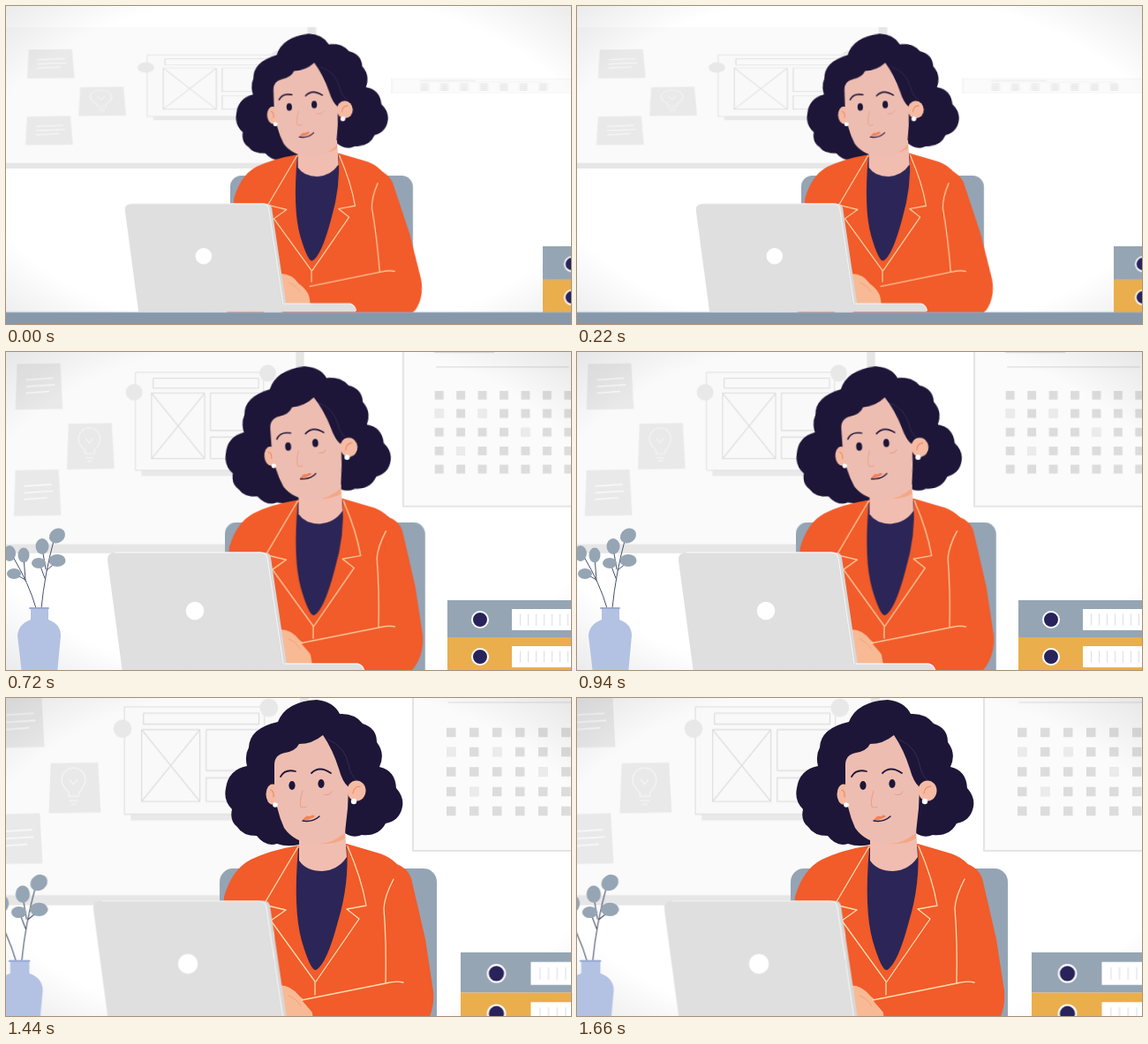
An HTML page for the animation above (1.8 s loop, 640 px wide and 360 px high).

```html
<!DOCTYPE html>
<html lang="en">
<head>
<meta charset="utf-8">
<title>At the desk</title>
<style>
html, body { margin: 0; width: 100%; height: 100%; overflow: hidden; background: #fff; }
svg { display: block; width: 100%; height: 100%; }

/* Every layer holds five poses, 360 ms each */
.layer { animation: 1800ms step-end infinite; }
#board { animation-name: board; transform-origin: 0 0; }
#calendar { animation-name: calendar; transform-origin: 0 0; }
#chair { animation-name: chair; transform-origin: 316.6px 187px; }
#hair { animation-name: hair; transform-origin: 349px 84px; }
#body { animation-name: body; transform-origin: 350px 169px; }
#arm { animation-name: arm; transform-origin: 430px 215px; }
#face { animation-name: face; transform-origin: 340.5px 98px; }
#desk { animation-name: desk; transform-origin: 311px 195px; }
#binders { animation-name: binders; }
#vase { animation-name: vase; }

@keyframes board {
  0% { transform: translate(11.7px, 39px) scale(.94, .59); }
  20% { transform: none; }
  40% { transform: translate(-1.5px, -3.3px) scale(.94); }
  60% { transform: translate(-16.6px, -12.6px) scale(.985); }
  80%, 100% { transform: translate(-28.7px, -18.8px) scale(1.03); }
}
@keyframes calendar {
  0% { transform: translate(40px, 85.4px) scale(.861, .078); }
  20% { transform: translate(11.2px, 34.3px) scale(.915, .762); }
  40% { transform: translate(16.7px, 12.3px) scale(.94); }
  60% { transform: translate(6px, 4.9px) scale(.976); }
  80%, 100% { transform: none; }
}
@keyframes chair {
  0% { transform: scale(.842); }
  20% { transform: scale(.853); }
  40% { transform: scale(.923); }
  60% { transform: scale(.968); }
  80%, 100% { transform: none; }
}
@keyframes hair {
  0% { transform: translate(-4px, 17.5px) rotate(-4deg) scale(.855); }
  20% { transform: translate(-11.5px, 16.5px) rotate(-4deg) scale(.86); }
  40% { transform: translate(-8.5px, 8.5px) rotate(-4deg) scale(.93); }
  60% { transform: translate(-5.5px, 3.5px) rotate(-2deg) scale(.965); }
  80%, 100% { transform: none; }
}
@keyframes body {
  0% { transform: translate(-4px, 1px) scale(.852); }
  20% { transform: translate(-4px, 1px) scale(.863); }
  40% { transform: translate(-2px, .5px) scale(.925); }
  60% { transform: translate(-1px, 0) scale(.968); }
  80%, 100% { transform: none; }
}
@keyframes arm {
  0% { transform: skewX(5.7deg); }
  20%, 100% { transform: none; }
}
@keyframes face {
  0% { transform: translate(-5.5px, 15px) rotate(-2deg) scale(.86); }
  20% { transform: translate(-7px, 13.5px) rotate(-4deg) scale(.86); }
  40% { transform: translate(-5.5px, 7px) rotate(-4deg) scale(.938); }
  60% { transform: translate(-1.5px, 2.5px) rotate(-1.5deg) scale(.975); }
  80%, 100% { transform: none; }
}
@keyframes desk {
  0% { transform: scale(.899); }
  20% { transform: scale(.909); }
  40% { transform: none; }
  60% { transform: scale(1.045); }
  80%, 100% { transform: scale(1.082); }
}
@keyframes binders {
  0% { transform: translateX(141px); }
  20% { transform: translateX(33px); }
  40%, 100% { transform: none; }
}
@keyframes vase {
  0% { transform: translateX(-300px); }
  20% { transform: translateX(-98px); }
  40%, 100% { transform: none; }
}
</style>
</head>
<body>
<svg viewBox="0 0 640 360" preserveAspectRatio="none" fill="none" stroke-linecap="round" stroke-linejoin="round">
  <defs>
    <radialGradient id="vignette" r=".71">
      <stop offset=".76" stop-opacity="0"/>
      <stop offset="1" stop-opacity=".08"/>
    </radialGradient>
    <path id="note" fill="#e9e9e9" d="M2 0 54 -1 57 54 0 55Z"/>
    <path id="noteLines" stroke="#fff" stroke-width="1.3" d="M13 19 45 17M13 27 47 25M13 35 40 33"/>
    <g id="binder">
      <path d="M0 0H240V42H0Z"/>
      <circle cx="37" cy="22" r="9" fill="#28235a" stroke="#fff" stroke-width="2"/>
      <path fill="#fff" d="M73 10H240V34H73Z"/>
      <path stroke="#dcdfe4" stroke-width="13" stroke-linecap="butt" stroke-dasharray="1 8" d="M82 22H240"/>
    </g>
  </defs>

  <path fill="#fff" d="M0 0H640V360H0Z"/>

  <g id="board" class="layer">
    <path fill="#e6e6e6" d="M-80 -25H361V246H-80Z"/>
    <path fill="#fafafa" d="M-80 -25H351V235H-80Z"/>
    <use href="#note" x="13" y="18"/>
    <use href="#noteLines" x="13" y="18"/>
    <use href="#note" x="75" y="90"/>
    <use href="#note" x="11" y="146"/>
    <use href="#noteLines" x="11" y="146"/>
    <path stroke="#f6f6f6" stroke-width="1.2" d="M97 126V122Q89 115 89 108A13 13 0 0 1 115 108Q115 115 108 122V126ZM98 131H107M100 135H105M98 108 102 113 106 108"/>
    <path fill="#e9e9e9" d="M165 146H312V153H165Z"/>
    <path fill="#f9f9f9" stroke="#dedede" d="M158 28H312V146H158Z"/>
    <g stroke="#dcdcdc" stroke-width="1.1">
      <path d="M179 35H306V47H179ZM177 53H241V132H177ZL241 132M241 53 177 132"/>
      <path d="M248 53H306V98H248ZM248 106H306V132H248Z"/>
    </g>
    <g fill="#e8e8e8"><circle cx="156" cy="52" r="10"/><circle cx="317" cy="29" r="10"/></g>
  </g>

  <g id="calendar" class="layer">
    <path fill="#fbfbfb" stroke="#e4e4e4" stroke-width="2" d="M461 -46H720V173H461Z"/>
    <path stroke="#dedede" stroke-width="2" d="M499 -13H570"/>
    <path stroke="#dedede" stroke-width="1.2" d="M501 5H660"/>
    <path stroke="#dcdcdc" stroke-width="10.5" stroke-linecap="butt" stroke-dasharray="10.5 15.5"
      d="M499 39H666M499 61H666M499 83.5H666M499 106H666M499 128H666"/>
    <path stroke="#ebebeb" stroke-width="10.5" stroke-linecap="butt"
      d="M499 61H509.5M551 61H561.5M603 83.5H613.5M525 106H535.5"/>
  </g>

  <path fill="url(#vignette)" d="M0 0H640V360H0Z"/>

  <rect id="chair" class="layer" x="242" y="193" width="246" height="300" rx="15" fill="#94a4b4"/>

  <g id="hair" class="layer">
    <path fill="#1d1638" d="M332 166Q318 169 307 165Q294 169 284 156Q268 156 262 146Q253 139 256 126Q246 116 249 102Q252 81 273 77Q270 65 275 56Q276 34 308 27Q317 4 352 2Q371 4 378 18Q395 17 404 29Q420 34 420 50Q430 63 423 78Q441 82 442 102Q451 112 449 123Q446 139 430 142Q422 157 403 155Q391 160 380 150Z"/>
    <path stroke="#332c56" d="M365 47Q384 55 388 75Q390 88 398 94"/>
  </g>

  <g id="body" class="layer">
    <path fill="#f25b2a" d="M331 167Q300 172 277 183Q256 194 247 225L235 420H440L452 200Q440 180 420 175L386 165Z"/>
    <path fill="#2b2657" d="M331 170Q325 240 335 275Q345 309 351 308Q363 302 376 253Q389 210 386 168Z"/>
    <path fill="#f1bdb0" d="M332 155V184Q340 196 358 196Q376 195 386 180L384 148Z"/>
    <path fill="#f5a784" d="M342 164Q368 164 384 153V159Q370 168 342 164Z"/>
    <g stroke="#fddcae" stroke-width="1.3">
      <path d="M331 168 292 234 317 240 300 252 350 321V336"/>
      <path d="M387 168Q403 205 408 235L386 239 400 250 351 321"/>
    </g>
    <path fill="#f8ba95" d="M303 326Q321 322 333 338Q345 347 347 356L350 375H300Z"/>
    <path stroke="#f0a27e" d="M320 337Q330 341 334 349"/>
    <g id="arm" class="layer">
      <path fill="#f25b2a" d="M440 187Q455 192 459 204Q467 238 475 273L484 332Q486 356 472 374Q464 381 450 381H352L347 356 335 342 430 323Z"/>
      <path stroke="#fddcae" stroke-width="1.3" d="M439 205Q429 224 428 238Q431 275 430 323M335 342 430 323Q442 320 450 322"/>
    </g>
  </g>

  <g id="face" class="layer">
    <ellipse cx="302" cy="109" rx="7.5" ry="11.5" fill="#f4b9a2"/>
    <ellipse cx="397" cy="105" rx="10.5" ry="11.5" fill="#f6bba4"/>
    <path fill="#eebdb1" d="M304 76Q304 64 316 62Q328 60 332 52Q347 52 359 42Q370 58 377 80Q381 95 388 101L387 125 384 152Q368 167 348 165Q326 163 315 147Q305 125 304 100Z"/>
    <path stroke="#e78d6d" stroke-width="1.2" d="M393 108Q394 100 401 100M300 104Q304 106 303 112"/>
    <g fill="#fff"><circle cx="305" cy="121" r="2.8"/><circle cx="394" cy="117" r="3.2"/></g>
    <g fill="#1d1638">
      <ellipse cx="324" cy="99" rx="3.6" ry="5"/>
      <ellipse cx="357" cy="97" rx="3.6" ry="5"/>
    </g>
    <path stroke="#1d1638" stroke-width="1.8" d="M311 89Q316 80 328 83M346 85Q355 76 368 85"/>
    <path stroke="#e9a18d" stroke-width="1.1" d="M336 105Q332 118 334 123Q337 125 340 123M360 109Q366 111 369 106"/>
    <path fill="#f0825c" d="M336 138Q340 132 344 134Q348 131 350 134Q344 139 336 138Z"/>
    <path stroke="#1d1638" stroke-width="1.5" d="M336 139Q347 141 355 134"/>
  </g>

  <g id="desk" class="layer">
    <g id="binders" class="layer">
      <use href="#binder" x="500" y="281" fill="#95a5b4"/>
      <use href="#binder" x="500" y="323" fill="#eaae4c"/>
    </g>
    <path fill="#8798ab" d="M-400 364H1100V480H-400Z"/>
    <path stroke="#9caec0" d="M-400 364H1100"/>

    <path fill="#d8d8d8" d="M280 227H293Q299 227 300 233L318 354 312 364H290Z"/>
    <path fill="#dfdfdf" d="M124 227H287Q294 227 295 233L314 363H132L115 236Q114 227 124 227Z"/>
    <path stroke="#f4f4f4" stroke-width="1.3" d="M124 227H288Q295 227 296 233L314 353"/>
    <path fill="#dfdfdf" d="M132 362 314 353H398Q405 354 406 363H132Z"/>
    <path stroke="#f4f4f4" stroke-width="1.3" d="M316 353H398Q404 354 406 361"/>
    <circle cx="214" cy="293" r="10.3" fill="#fff"/>

    <g id="vase" class="layer">
      <path stroke="#454e6b" d="M40 290Q44 250 54 214M46 247 57 238M44 256 38 240M45 246 41 222M34 290Q26 262 8 232M22 258 20 232M22 258 10 251"/>
      <g fill="#95a5b4">
        <ellipse cx="58" cy="208" rx="9.5" ry="8" transform="rotate(-35 58 208)"/>
        <ellipse cx="41" cy="220" rx="7.5" ry="9"/>
        <ellipse cx="58" cy="236" rx="9.5" ry="7"/>
        <ellipse cx="37" cy="239" rx="8" ry="6"/>
        <ellipse cx="20" cy="230" rx="6.5" ry="8.5"/>
        <ellipse cx="4" cy="228" rx="7" ry="9"/>
        <ellipse cx="9" cy="251" rx="8" ry="6"/>
      </g>
      <path fill="#b3c1e3" d="M28 289H48V303Q62 308 62 321L58 364H18L13 321Q14 308 28 303Z"/>
      <path stroke="#9aaad2" stroke-width="1.8" d="M27 290H48"/>
    </g>
  </g>
</svg>
</body>
</html>
```
